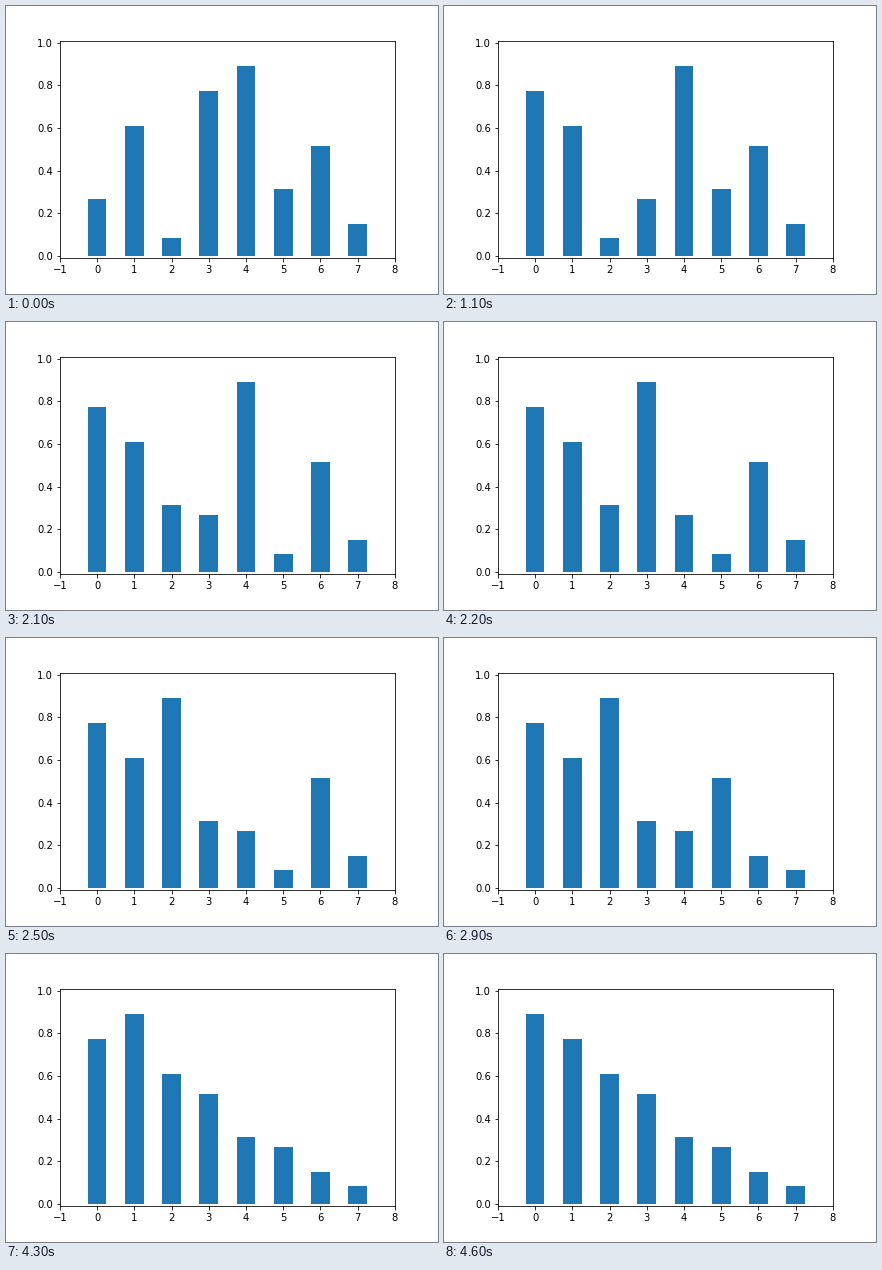
Write a matplotlib script that moves like this. It is 432 by 288 pixels and loops after 5700 ms.

```python
import math

import matplotlib.pyplot as plt
from matplotlib.animation import FuncAnimation

STEP = 100   # ms per frame
FRAMES = 57
START = [0.267, 0.609, 0.084, 0.773, 0.890, 0.314, 0.515, 0.150]
WALK = [0, 3, 2, 5, 3, 4]   # slots the first bar hops through


def swap(heights, i, j):
    heights[i], heights[j] = heights[j], heights[i]


def order(heights, j):
    if heights[j] < heights[j + 1]:
        swap(heights, j, j + 1)


def heights_at(frame):
    heights = START[:]
    # Long hops, quicker and quicker, the last one at frame 22
    hops = list(zip(WALK, WALK[1:]))
    for left, (i, j) in zip(range(len(hops) - 1, -1, -1), hops):
        if frame >= round(22 - left ** 1.75):
            swap(heights, i, j)
    # Bubble pass to the right, one pair per frame
    for j in range(7):
        if frame >= 23 + j:
            order(heights, j)
    # Slower pass back to the left
    for k in range(5):
        if frame >= math.ceil(32 + 3.5 * k):
            order(heights, 4 - k)
    return heights


plt.rcParams["font.family"] = "DejaVu Sans"
fig = plt.figure(figsize=(6, 4), dpi=72, facecolor="white")
ax = fig.add_axes([0.125, 0.125, 0.775, 0.755])
bars = ax.bar(range(len(START)), START, width=0.5, color="#1f77b4")
ax.set_xlim(-1, 8)
ax.set_ylim(-0.01, 1.01)
ax.set_xticks(range(-1, 9))
ax.set_yticks([n / 5 for n in range(6)])


def update(frame):
    for bar, height in zip(bars, heights_at(frame)):
        bar.set_height(height)
    return list(bars)


anim = FuncAnimation(fig, update, frames=FRAMES, interval=STEP,
                     repeat=True, repeat_delay=0)
plt.show()
```
